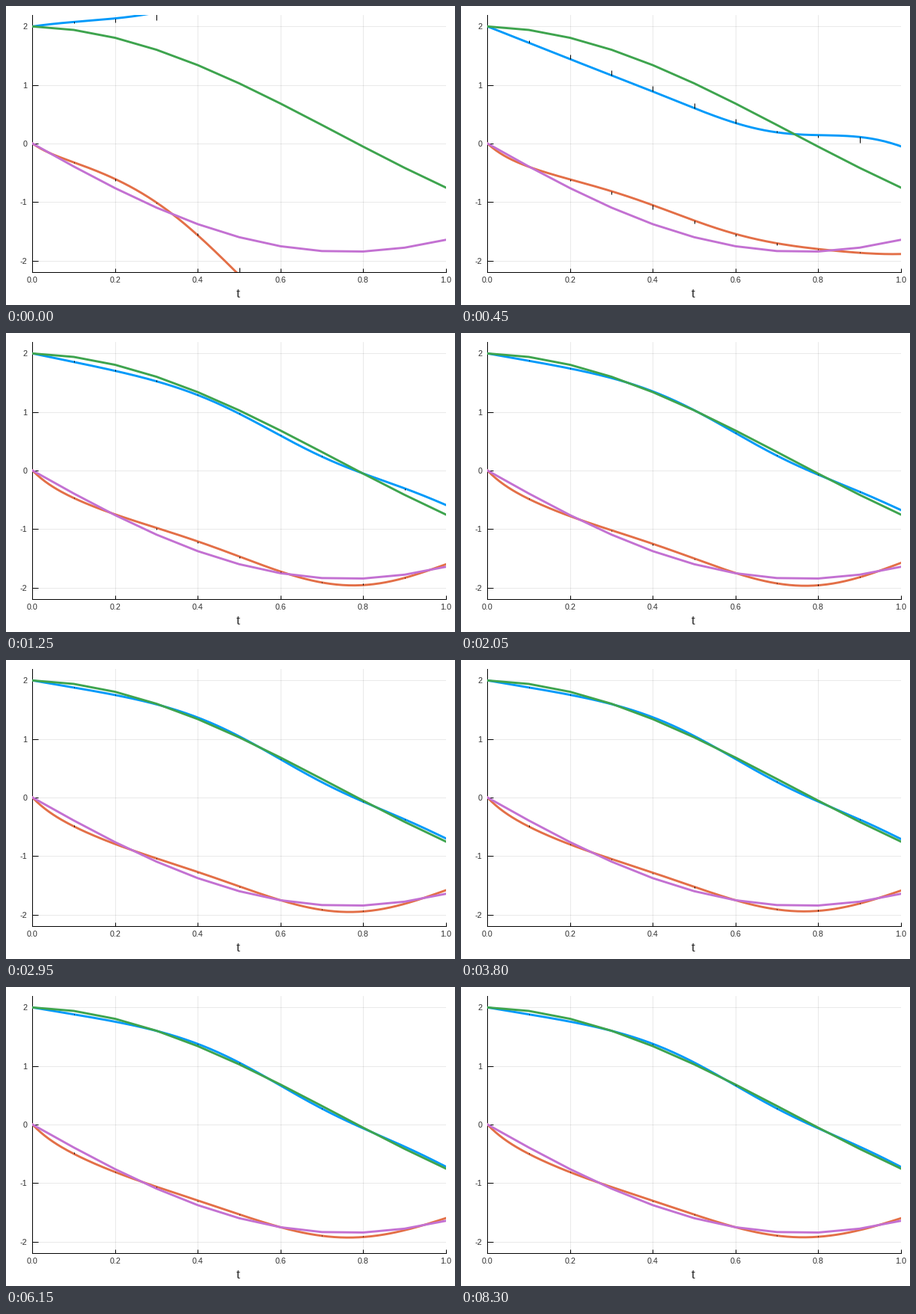
These frames come from a looping animation (600x400 px, 8.35 s). A matplotlib script:

```python
import numpy as np
import matplotlib.pyplot as plt
from matplotlib.animation import FuncAnimation

W, H, FRAMES, STEP = 600, 400, 167, 50
LEFT, RIGHT, TOP, BOTTOM = 35.4, 587.8, 11.7, 356.2
BLUE, ORANGE, GREEN, PURPLE = "#009afa", "#e36f47", "#3ea44e", "#c371d2"
INK = "#303030"
PT = 0.72  # points per pixel at 100 dpi

plt.rcParams["font.family"] = "Liberation Sans"

sin, cos, exp = np.sin, np.cos, np.exp


def truth(t):
    """The data: a slowly damped rotation."""
    return np.array([2 * cos(2 * t), -2 * sin(2 * t)]) * exp(-0.1 * t)


def ripple(t):
    """Misfit that remains when training has settled."""
    fade = exp(-8 * t)
    return np.array([
        -(0.042 + 0.06 * fade) * sin(9.85 * t + 2 * t**2),
        -(0.074 + 0.08 * fade) * sin(9.38 * t + 0.65 * (1 - exp(-20 * t))),
    ])


def slow(t):
    return np.array([-0.05 * t + 0.09 * t**5,
                     0.05 * sin(2.68 * t + 4.26 * t**2)])


def medium(t):
    return np.array([-(0.45 + 0.12 * t**3) * sin(3.35 * t + 1.4 * t**2),
                     0.2 * sin(3.5 * t) + 0.33 * t**2 * sin(9.24 * t - 5.17)])


def fast(t):
    return np.array([7 * t - 1.75 * t**2,
                     -5.1 * t**2 - 0.09 * sin(2 * np.pi * t) ** 2])


def model(t, step):
    """Training removes three error shapes, each at its own rate."""
    return (truth(t) + ripple(t)
            + slow(t) * exp((41 - step) / 40)
            + medium(t) * exp((9 - step) / 8)
            + fast(t) * exp(-step / 1.6))


t_data = np.linspace(0, 1, 11)
t_fine = np.linspace(0, 1, 201)
data = truth(t_data)

fig = plt.figure(figsize=(W / 100, H / 100), dpi=100, facecolor="white")
ax = fig.add_axes([LEFT / W, 1 - BOTTOM / H, (RIGHT - LEFT) / W, (BOTTOM - TOP) / H])
ax.set(xlim=(0, 1), ylim=(-2.2, 2.2))
ax.set_xticks(np.arange(6) / 5, [f"{k / 5:.1f}" for k in range(6)])
ax.set_yticks(range(-2, 3), [str(k) for k in range(-2, 3)])
ax.grid(color="black", alpha=0.1, lw=0.6)
ax.set_axisbelow(True)
ax.spines[["top", "right"]].set_visible(False)
ax.spines[["left", "bottom"]].set_linewidth(PT)
ax.tick_params(direction="in", width=PT, labelsize=10.8 * PT, labelcolor=INK)
ax.tick_params(axis="x", length=5 * PT, pad=5.5 * PT)
ax.tick_params(axis="y", length=8 * PT, pad=7 * PT)
fig.text(310 / W, 10 / H, "t", size=17 * PT, color=INK, ha="center", va="baseline")

lines = [ax.plot([], [], color=c, lw=2.1, zorder=3)[0] for c in (BLUE, ORANGE)]
for values, color in zip(data, (GREEN, PURPLE)):
    ax.plot(t_data, values, color=color, lw=2.1, zorder=4)
pulls = ax.vlines([], [], [], color="black", lw=PT, zorder=5)


def update(frame):
    for line, values in zip(lines, model(t_fine, frame)):
        line.set_data(t_fine, values)
    # Each bar covers a fifth of the gap to the data
    fit = model(t_data, frame)
    ends = fit + 0.2 * (data - fit)
    pulls.set_segments([[(t, a), (t, b)]
                        for starts, stops in zip(fit, ends)
                        for t, a, b in zip(t_data[1:], starts[1:], stops[1:])])
    return [*lines, pulls]


anim = FuncAnimation(fig, update, frames=FRAMES, interval=STEP, repeat=True,
                     repeat_delay=0, blit=False)
plt.show()
```
